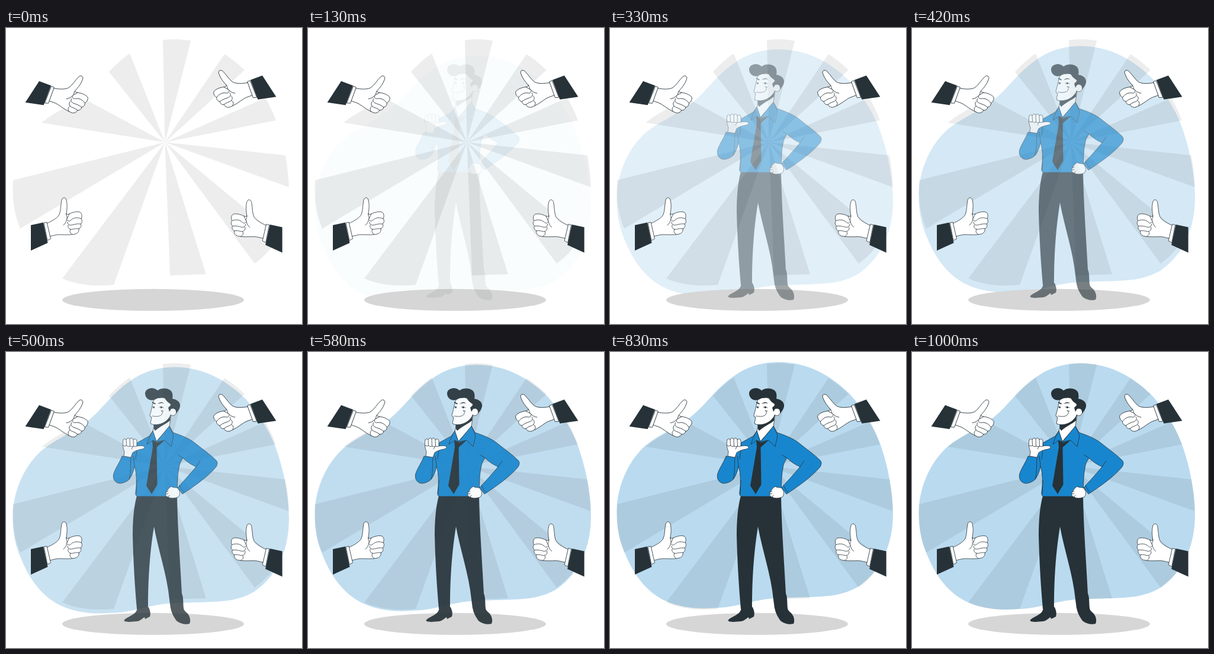
An HTML page that plays this animation: 500x500 px, repeating every 1040 ms.

```html
<!DOCTYPE html>
<html lang="en">
<head>
<meta charset="utf-8">
<title>Thumbs up</title>
<style>
  html, body { margin: 0; width: 100%; height: 100%; overflow: hidden; background: #fff; }
  svg { display: block; width: 100vw; height: 100vh; }
  .line { fill: none; stroke: #263238; stroke-width: .8; stroke-linecap: round; stroke-linejoin: round; }
  .skin { fill: #fff; stroke: #263238; stroke-width: .8; stroke-linejoin: round; }
  .cloth { fill: #1886ce; stroke: #263238; stroke-width: .8; stroke-linejoin: round; }
  .dark { fill: #263238; }
</style>
</head>
<body>
<svg viewBox="0 0 500 500">
  <defs>
    <path id="blobShape" d="M284 19C337 19 376 45 403 71C423 92 445 125 456 156C470 195 478 240 478 275C478 325 460 370 420 398C393 414 365 415 338 416C310 417 295 417 277 418C240 421 215 433 182 434C150 437 120 434 95 423C58 406 38 374 24 339C14 315 10 290 12 257C16 222 32 185 60 160C85 140 115 128 137 111C150 101 162 87 174 74C184 63 196 52 209 43C230 27 257 19 284 19Z"/>
    <clipPath id="blobClip"><use href="#blobShape"/></clipPath>
    <g id="thumb">
      <path class="dark" d="M42 333L63 328.500L70.500 363L42 376Z"/>
      <path class="skin" d="M69 330C78 326 87 321 90 315C93 308 92 300 94 291C95 285.500 101 285 102 291C104 299 103 306 102 313C101 316 104 315 107 314C113 311 120 309.500 125 311C129 313 128.500 320 127 322C129 324 129 329 126 331C128 334 126 338 123 339C124 343 121 347 117 348C108 350 97 349 90 349C84 349 79 351 74 352Z"/>
      <path class="skin" d="M64 329L69 328L75.500 356L70 359Z"/>
      <path class="line" d="M102 313C101 318 104 319 103 322C102 327 100 331 97 333M107 314C106 317 104 319 103 322M127 322C119 319 113 321 109 325C107 327 104 326 103 324M126 331C118 330 113 333 109 333C106 333 104 331 104 328M123 339C116 338 112 341 109 340C106 339 104 337 105 333M109 340C107 343 108 347 112 348.500"/>
    </g>
    <g id="tiltedThumb"><use href="#thumb" transform="translate(71 112.500) rotate(33) translate(-67 -344)"/></g>
  </defs>

  <use id="blob" href="#blobShape" fill="#badaef"/>
  <path id="rays" fill="#000" fill-opacity=".07" clip-path="url(#blobClip)"/>
  <ellipse cx="248.500" cy="459.300" rx="153.500" ry="18.500" fill="#d6d6d6"/>

  <g id="person">
    <!-- legs and shoes -->
    <path class="dark" d="M222 433L220 438C216 445 203 448 199.500 453C200 457 210 456 221 455C228 454 231 449 234 448L235 451L243 447C245 441 243 436 241 431ZM278 431C279 441 284 448 288 454C294 459 304 461 310 459C313 453 310 445 306 441C303 438 300 436 300 432Z"/>
    <path class="dark" d="M221 243C216 260 214 285 214 310C215 355 218 400 221 434Q231 435 240 432C240 400 241 350 250 295C257 334 272 376 276 418L278 433Q290 436 300 433C299 424 300 414 297 408C294 350 290 300 289 244Z"/>
    <!-- shirt -->
    <path class="cloth" d="M247 135L242 142L222 153C217 165 212 172 208 177L196 176C192 187 184 197 181.500 207C180 216 186 222 193 222C200 221 206 218 209 214C213 208 216 200 217 193C221 205 221 222 219 236Q218 243 222 244L274 244L289 242C290 228 289 210 292 197C293 188 296 184 299 179C307 187 315 191 321 194C311 206 300 218 290 229L298 240C318 227 342 210 355 194Q359 187 355 183C345 173 332 164 322 156C312 147 297 141 282 136L276 125Z"/>
    <path class="line" d="M211 178C210 192 211 207 208 215M217 193C217 186 215 180 215 176M222 157L219 181M299 179L291 174M321 194L328 184M293 225Q297 235 301 237M221 217L220 240"/>
    <!-- neck, tie and collar -->
    <path class="skin" d="M251 122L248 134L254 151L276 126L279 105Z"/>
    <path class="dark" d="M249 121C259 124 271 117 278 106L277 116C271 121 261 125 252 133L250 130Z"/>
    <path class="dark" d="M247 149L255 153L268 149L254.500 161L255.500 224L246 240L237 226L248 161Z"/>
    <path class="cloth" d="M248 133C244 140 240 149 238 156L248 149L254 152ZM276 125L254 152L268 149L279 160C280 152 284 144 282 138Z"/>
    <!-- head -->
    <path class="skin" d="M251 78C247 87 246 98 243 107Q243 110 246 110L244 121C252 125 264 122 271 116C275 112 277 110 278 106C283 110 288 105 288 101C288 95 281 94 278 96L279 76Z"/>
    <path class="dark" d="M235 71C234 62 248 57 256 65C264 59 279 61 281 70Q282 75 281 79C289 80 295 85 294 92C293 97 290 101 287 104C288 97 284 94 279 96L276 101L274 94L279 89C275 85 271 84 269 79C264 76 258 77 254 79C247 84 236 81 235 71Z"/>
    <path class="dark" d="M256 88Q262 82 267 87Q262 85 256 88ZM247 84L253 87L252 88.500L247 86Z"/>
    <path class="line" d="M259 93Q262 91 266 94M247 93Q249 91 251 93M247 108C254 110 262 109 264 104Q265 101 263 99M262 99L266 100"/>
    <path class="dark" d="M261 92h2.500v3h-2.500ZM248.500 92h2v3h-2Z"/>
    <!-- hands -->
    <path class="skin" d="M199 176L200 168C197 162 197 154 198 148Q201 145 203 148Q206 143 209 147Q213 143 215 148Q220 145 221 150L221 159C227 158 232 158 234 160Q235 163 230 164C223 165 218 167 214 170L211 178Z"/>
    <path class="line" d="M203 148L203.500 158M209 147L209.500 159M215 148L215.500 159M198 158Q201 160 203.500 158Q206 161 209.500 159Q212 161 215.500 159Q218 161 221 159M215 159L212 164"/>
    <path class="skin" d="M279 227C283 230 287 228 290 230C294 235 295 240 291 245C286 247 278 248 274 245C269 244 269 240 271 236Q274 230 279 227Z"/>
    <path class="line" d="M271 236L274 235M270 240L274 239M274 245L276 242"/>
  </g>

  <use href="#thumb"/>
  <use href="#thumb" transform="translate(508.700 3.500) scale(-1 1)"/>
  <use href="#tiltedThumb"/>
  <use href="#tiltedThumb" transform="translate(489 -9.500) scale(-1 1)"/>
</svg>
<script>
  const LOOP = 1040, FPS = 24, HELD_STEPS = 3, RISE = 30;
  const blob = document.getElementById('blob');
  const person = document.getElementById('person');

  // Each ray is a wedge from the hub through two rim points, cut off by the blob outline.
  const hub = [268.5, 193];
  const rims = [
    [265, 20, 312, 22], [369, 44, 403, 71], [438, 118, 456, 156], [472, 215, 478, 269],
    [450, 343, 420, 398], [338, 416, 277, 418], [182, 434, 95, 423], [24, 339, 12, 257],
    [60, 160, 140, 124], [174, 74, 209, 43]
  ];
  const beyond = (x, y) => [hub[0] + (x - hub[0]) * 1.15, hub[1] + (y - hub[1]) * 1.15];
  document.getElementById('rays').setAttribute('d', rims.map(([ax, ay, bx, by]) =>
    `M${hub}L${beyond(ax, ay)}L${beyond(bx, by)}Z`).join(''));

  const bezier = (a, b, s) => 3 * (1 - s) ** 2 * s * a + 3 * (1 - s) * s * s * b + s ** 3;

  // cubic-bezier(.36, -.01, .5, 1.38): overshoots before it settles
  function ease(x) {
    if (x >= 1) return 1;
    let low = 0, high = 1;
    for (let i = 0; i < 24; i++) {
      const mid = (low + high) / 2;
      if (bezier(.36, .5, mid) < x) low = mid; else high = mid;
    }
    return bezier(-.01, 1.38, low);
  }

  // Steps start on whole hundredths of a second.
  function stepAt(ms) {
    let step = 0;
    while (Math.round((step + 1) * 100 / FPS) * 10 <= ms) step++;
    return step;
  }

  function render(ms) {
    const step = stepAt(ms % LOOP);
    const progress = step < HELD_STEPS ? 0 : ease((step + .5) / FPS);
    const opacity = Math.min(1, progress);
    blob.setAttribute('opacity', opacity);
    blob.setAttribute('transform', `translate(0 ${RISE * (1 - progress)})`);
    person.setAttribute('opacity', opacity);
  }

  const start = performance.now();
  function tick() {
    render(performance.now() - start);
    requestAnimationFrame(tick);
  }
  tick();
</script>
</body>
</html>
```
